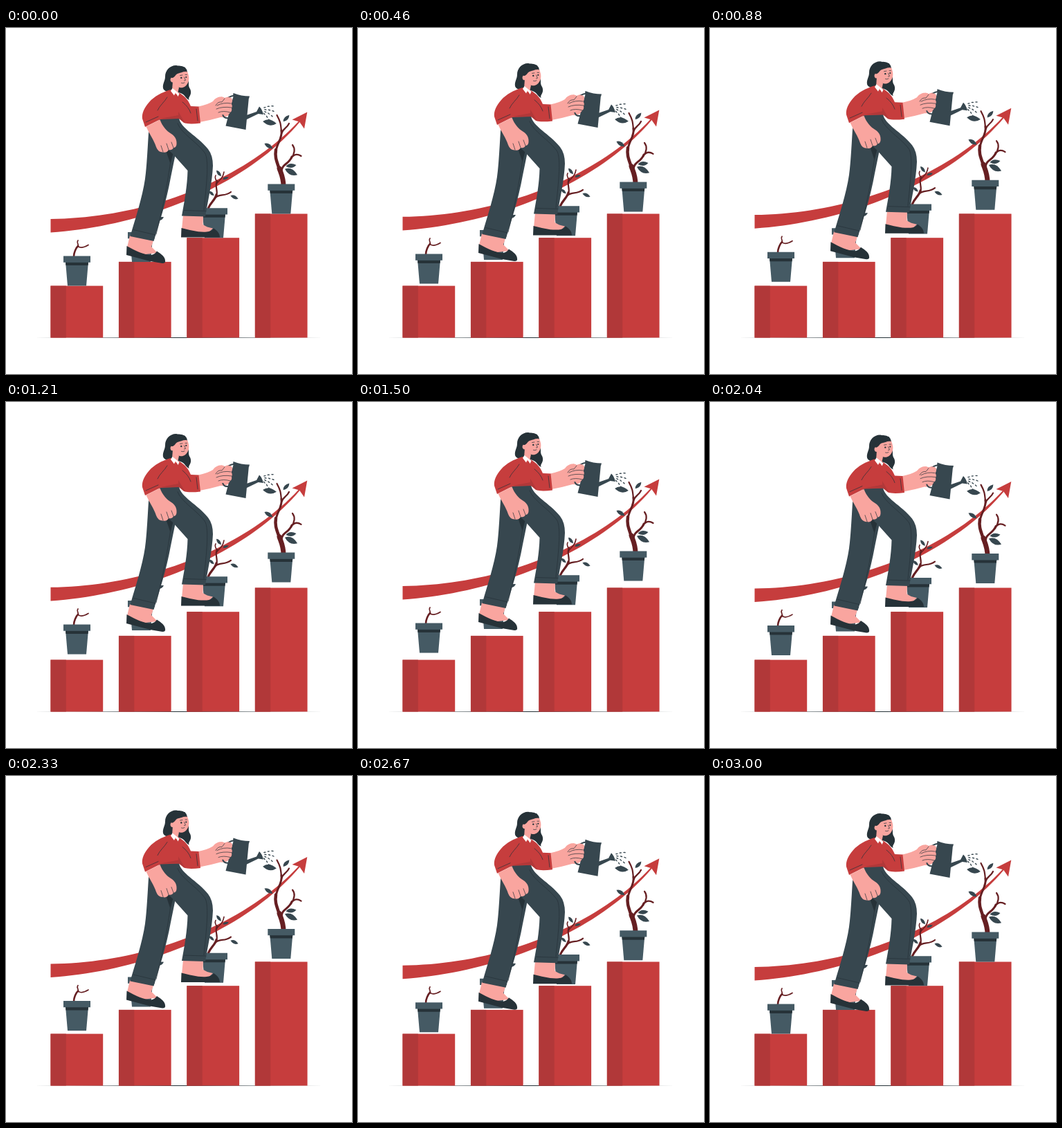
An HTML page for the animation above (3.04 s loop, 500x500 px).

```html
<!DOCTYPE html>
<html lang="en">
<head>
<meta charset="utf-8">
<title>Growth</title>
<style>
html, body { margin: 0; width: 100%; height: 100%; overflow: hidden; background: #fff; }
svg { display: block; width: 100vw; height: 100vh; }
.red { fill: #c63d3d; }
.shade { fill: #b13839; }
.ink { fill: #263238; }
.slate { fill: #37474f; }
.pot { fill: #455a64; }
.skin { fill: #f9a59f; }
.stem, .line { fill: none; stroke: #661f22; stroke-linecap: round; stroke-linejoin: round; }
.line { stroke: #263238; stroke-width: .7; }
</style>
</head>
<body>
<svg viewBox="0 0 500 500">
  <defs>
    <path id="leaf" class="slate" d="M-10 0Q-2 -8 10 0Q1 8 -10 0Z"/>
    <g id="pot">
      <path class="pot" d="M3 8H36L33 43H6Z"/>
      <path class="ink" d="M3 9H36L35.5 13.500H3.500Z"/>
      <path class="pot" d="M0 0H39V9.300H0Z"/>
    </g>
  </defs>

  <path class="ink" d="M41 447.500L250 447L458 447.500L250 448Z"/>
  <g id="bars"></g>

  <g id="float">
    <path id="swoosh" class="red"/>
    <path class="red" d="M413.500 132.500L435.300 121.500L431 145.500L424 135.500Z"/>

    <g class="stem">
      <path stroke-width="2.600" d="M98 330C98 325 101 318 104 315"/>
      <path stroke-width="1.700" d="M104 316C106 312 101 311 104 307M104 315Q108 320 119 313.500"/>

      <path stroke-width="3.200" d="M292 261C296 251 302 249 304 241"/>
      <path stroke-width="2.200" d="M304 243C307 234 301 230 305 221M303 245C309 239 316 244 325 237"/>
      <path stroke-width="1.600" d="M304 226C308 218 313 220 315 208M305 222Q301 217 303 213"/>

      <path stroke-width="7" d="M401 229C401 216 397 209 395 203"/>
      <path stroke-width="4.500" d="M396 207C392 194 388 188 390 176"/>
      <path stroke-width="3" d="M398 207C399 196 409 197 413 186M390 180C390 168 400 160 398 148"/>
      <path stroke-width="2.200" d="M398 150C397 139 397 136 391.500 126M398 153C400 145 406 145 409 138"/>
      <path stroke-width="2.200" d="M412 189C418 180 418 174 414 169M412 188C417 181 422 182 426.500 185"/>
    </g>

    <use href="#leaf" transform="translate(381 136.500) rotate(8)"/>
    <use href="#leaf" transform="translate(405 130.500) rotate(-48) scale(.65)"/>
    <use href="#leaf" transform="translate(379.500 170.500) rotate(30) scale(.7)"/>
    <use href="#leaf" transform="translate(412 199) rotate(-8) scale(.75)"/>
    <use href="#leaf" transform="translate(412 208) rotate(25)"/>
    <use href="#leaf" transform="translate(307.500 210) rotate(50) scale(.55)"/>
    <use href="#leaf" transform="translate(317.500 217) rotate(-18) scale(.45)"/>
    <use href="#leaf" transform="translate(330 244.500) rotate(22) scale(.6)"/>
    <use href="#leaf" transform="translate(297 239) rotate(40) scale(.5)"/>
    <use href="#leaf" transform="translate(223 275.500) rotate(-25) scale(.55)"/>

    <use href="#pot" x="83" y="329.500"/>
    <use href="#pot" x="176" y="295"/>
    <use href="#pot" x="281" y="260.300"/>
    <use href="#pot" x="378.300" y="225.500"/>

    <!-- back leg -->
    <path class="skin" d="M179 300L213 307L210 316L219 325L193 328L175 317Z"/>
    <path class="ink" d="M174.500 315C187 322 200 328 210 328Q215 327 218 322.500C225 327 230 331 230 336Q231 340 226 340L208 337L174 328Z"/>
    <path class="slate" d="M209 140L206 152C204 185 203 205 201 218C197 245 187 275 179.500 301L213.500 308C222 280 232 250 238 216L247 172L238 140Z"/>
    <path class="ink" d="M231 177L243 176L237.500 196Z"/>
    <path class="line" d="M239 184C233 230 225 266 217 298M184 291.500L216 299"/>

    <!-- front leg -->
    <path class="skin" d="M256 270H285L284.500 284Q290 288 299 289.500L290 298L254 291Z"/>
    <path class="ink" d="M253.500 289C266 292 278 295.500 290 294.500Q297 294 300 289.500C304 292 309 296 309 302.500H253Z"/>
    <path class="slate" d="M223 130H250C252 145 277 156 292 175Q299 184 299 199C298 224 292 248 288 272.500L254 271.500C258 250 262 228 262.500 206L241 182C231 172 216 160 208 154Z"/>
    <path class="line" d="M248 138C253 152 276 165 287 180C295 190 288 240 286 263M257 263.500L289 264.500"/>

    <!-- hair behind -->
    <path class="ink" d="M246 54C236 54 230 62 230 70C230 77 226 80 227 87C229 93 237 93 241 90L252 94C259 96 260 103 265 104C262 100 270 97 266 88C262 82 266 79 262 72L259 57Z"/>

    <!-- far arm -->
    <path class="skin" d="M278 113.500Q291 111 299 106C305 98 312 99 316 101Q323 97 327 103L326 122Q320 130 310 129Q296 133 280 136Z"/>

    <!-- torso -->
    <path class="red" d="M238 89C225 93 214 99 207 107C200 115 196 123 197 131L201 143L223 132L250 131L257 137Q264 139.500 281 137.500L278.500 113.500L267 113C263 104 260 100 251 94Z"/>
    <path class="shade" d="M249 121C253 127 255 132 260 138L250 131H223L249 126Z"/>
    <path class="line" d="M233 100C229 107 222 112 219 119M255 107Q264 114 267 123M275 117L277 134M202 136L220 128"/>

    <!-- head -->
    <path class="skin" d="M241 76L240 91Q244 97 248 95L250 86Z"/>
    <path fill="#fff" d="M240.500 87L238 91L243 97.500L245 93L248.500 99L250.500 95Z"/>
    <path class="skin" d="M243 67C247 61 257 60 262 63C265 70 265 75 263 79C260 85 256 87 251 86C246 85 243 82 242 78C238 80 236 74 239 71.500Z"/>
    <path class="ink" d="M239 72C243 73 245 67 248 66C253 65 257 62 262 63.500Q261 55 250 54.500Q238 57 239 72Z"/>
    <path class="line" d="M251.500 68.500L255 68M259 67.500H261.500M257.500 71L259.500 75.500L257.500 76M253.500 79.500Q256 80.500 258 79"/>
    <circle class="ink" cx="253.300" cy="72" r="1.200"/>
    <circle class="ink" cx="260.300" cy="71" r="1.100"/>

    <!-- near arm -->
    <path class="skin" d="M202.500 142.500L222.500 132.500C226 142 232 149 239 153C245 157 247 162 246.500 168Q246 173 242 173Q240 177 235 176Q232 181 227 179.500Q220 180 217 172C214 162 207 153 202.500 142.500Z"/>
    <path class="line" d="M242 173L239 165M235 176L232 167M227 179L224 170"/>

    <!-- watering can -->
    <path fill="none" stroke="#37474f" stroke-width="2" d="M330 98C319 98 317 106 314 117C311 127 315 131 322 130"/>
    <path class="slate" d="M329 97L351 100L346.500 147L317.500 141.500Z"/>
    <path class="slate" d="M328.500 94Q340 98.500 352 98.500L351 102L328 98Z"/>
    <path class="slate" d="M346 126.500L362 121L366 113.500Q370 117 372 125L364.500 124L346 133Z"/>
    <path class="skin" d="M305 104C309 98 315 99 316 102Q323 98 326 102Q328 106 325 109Q328 112 326 116Q327 120 324 122Q322 127 315 125Q306 126 303 119Z"/>
    <path class="line" d="M303 112Q306 106 312 107L316 102M305 112Q314 107 325 109M304 117Q313 113 326 115M307 122Q314 119 324 122"/>
    <g id="drops"></g>
  </g>
</svg>
<script>
const LOOP = 3040, RISE = 3000, LIFT = 10, FPS = 24;
const $ = id => document.getElementById(id);
const repeat = (n, make) => Array.from({ length: n }, (_, i) => make(i));

// Bars rise by equal steps from one ground line
const bar = (i, kind, width) => {
  const top = 372.6 - 34.7 * i;
  return `<rect class="${kind}" x="${64.5 + 98.45 * i}" y="${top}" width="${width}" height="${447.5 - top}"/>`;
};
$('bars').innerHTML = repeat(4, i => bar(i, 'red', 75.7) + bar(i, 'shade', 22.3)).join('');

// The band follows a cubic curve and thins towards the arrowhead
const cubic = (a, b, c, d, t) => {
  const s = 1 - t;
  return a * s ** 3 + 3 * b * s * s * t + 3 * c * s * t * t + d * t ** 3;
};
const edge = side => repeat(41, i => {
  const t = i / 40, half = side * (9.8 - 8.8 * t);
  const x = cubic(64.5, 199, 344, 424, t) + half * .8 * t;
  const y = cubic(285.7, 280.5, 225.5, 135, t) + half * (1 - .4 * t);
  return `${x.toFixed(2)} ${y.toFixed(2)}`;
});
$('swoosh').setAttribute('d', `M${[...edge(-1), ...edge(1).reverse()].join('L')}Z`);

// Drops fan out from the spout
$('drops').innerHTML = repeat(12, i => {
  const ring = i % 3, angle = -28 + 21 * Math.floor(i / 3) + 5 * ring;
  return `<ellipse class="slate" rx="1.9" ry=".75"
    transform="translate(366 119) rotate(${angle}) translate(${9 + 5.5 * ring} 0) rotate(20)"/>`;
}).join('');

const start = performance.now();
function draw(now) {
  const t = Math.max(0, now - start) % LOOP;
  const step = Math.floor((t + 5) * FPS / 1000) * 1000 / FPS;
  const p = Math.min(step / RISE, 1);
  const y = -LIFT * (1 - Math.abs(1 - 2 * p));
  $('float').setAttribute('transform', `translate(0 ${y.toFixed(3)})`);
  requestAnimationFrame(draw);
}
draw(start);
</script>
</body>
</html>
```
